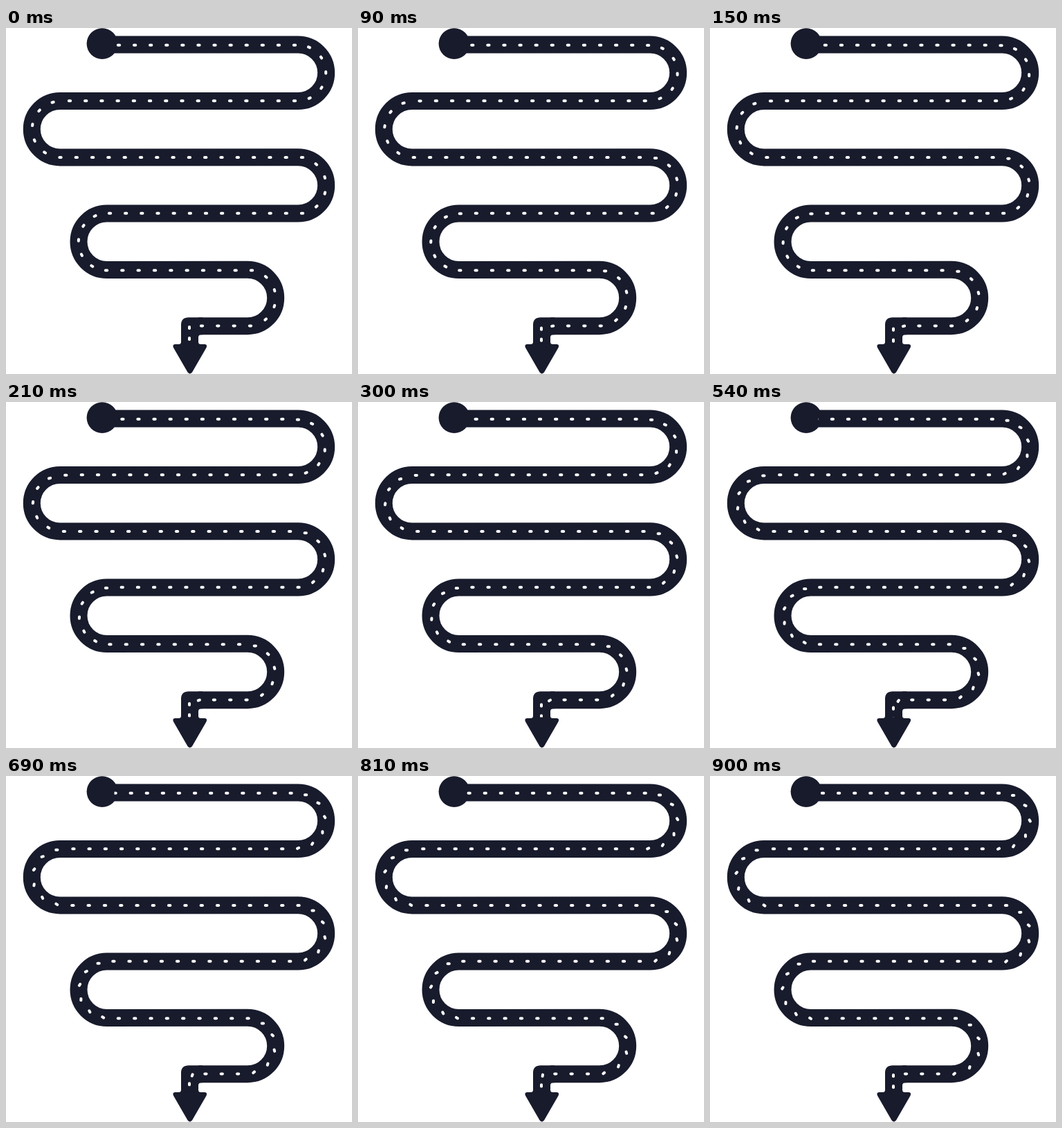
An HTML page with a canvas that plays this animation: 500x500 px, repeating every 930 ms.

```html
<!DOCTYPE html>
<html lang="en">
<head>
<meta charset="utf-8">
<title>Winding road</title>
<style>
  html, body { margin: 0; width: 100%; height: 100%; overflow: hidden; background: #fff; }
  canvas { display: block; width: 500px; height: 500px; }
</style>
</head>
<body>
<canvas id="stage" width="500" height="500"></canvas>
<script>
const ctx = document.getElementById('stage').getContext('2d');
const ROAD = '#181b2c';
const STEP_MS = 30, STEPS = 31;
const HALF_PI = Math.PI / 2;
const dashes = [];

function addRow(from, to, y, count) {
  for (let i = 0; i < count; i++) {
    dashes.push({ x: from + (to - from) * i / (count - 1), y, angle: 0 });
  }
}

// Angles are degrees away from the top of the bend; side is 1 for right, -1 for left.
function addBend(cx, cy, radius, side, first, step, count) {
  for (let i = 0; i < count; i++) {
    const turn = (first + step * i) * Math.PI / 180;
    dashes.push({
      x: cx + side * radius * Math.sin(turn),
      y: cy - radius * Math.cos(turn),
      angle: side * turn
    });
  }
}

addRow(139.9, 417, 24.8, 13);
addBend(422, 64.8, 40.2, 1, 23.5, 33, 5);
addRow(417, 92, 105.2, 15);
addBend(78, 146.2, 40.2, -1, 15, 33, 5);
addRow(78.5, 428, 187, 16);
addBend(422, 227.6, 40.4, 1, 40.5, 32.7, 4);
addRow(428, 150, 267.8, 13);
addBend(146, 309, 41.2, -1, 25, 30.8, 5);
addRow(145, 355, 350.2, 10);
addBend(349.2, 390.2, 40.4, 1, 41, 33, 4);
addRow(353, 283, 430.4, 4);
for (const y of [433, 449, 465]) dashes.push({ x: 265, y, angle: -HALF_PI });

const turnIndex = dashes.length - 4;

function drawRoad() {
  ctx.strokeStyle = ROAD;
  ctx.lineWidth = 25;
  ctx.beginPath();
  ctx.moveTo(139, 24.1);
  ctx.arc(422, 64.8, 40.7, -HALF_PI, HALF_PI);
  ctx.arc(78, 146.2, 40.7, -HALF_PI, HALF_PI, true);
  ctx.arc(422, 227.4, 40.7, -HALF_PI, HALF_PI);
  ctx.arc(145.7, 308.8, 40.7, -HALF_PI, HALF_PI, true);
  ctx.arc(349, 390, 40.7, -HALF_PI, HALF_PI);
  ctx.lineTo(278, 430.7);
  ctx.stroke();

  ctx.beginPath();
  ctx.arc(139, 22.6, 22.4, 0, Math.PI * 2);
  ctx.fill();

  ctx.beginPath();
  ctx.moveTo(284, 418.2);
  ctx.lineTo(264, 418.2);
  ctx.quadraticCurveTo(253, 418.2, 253, 429);
  ctx.lineTo(253, 458);
  ctx.lineTo(278, 458);
  ctx.lineTo(278, 447);
  ctx.quadraticCurveTo(278, 443.2, 282, 443.2);
  ctx.lineTo(284, 443.2);
  ctx.fill();
}

function drawHead() {
  ctx.beginPath();
  ctx.moveTo(253, 453.5);
  ctx.quadraticCurveTo(253, 457, 249.5, 457);
  ctx.lineTo(244.5, 457);
  ctx.quadraticCurveTo(240, 457.5, 242, 462);
  ctx.lineTo(262.5, 497.5);
  ctx.quadraticCurveTo(265.7, 501.5, 269, 497.5);
  ctx.lineTo(289.5, 462);
  ctx.quadraticCurveTo(291.5, 457.5, 287, 457);
  ctx.lineTo(281.5, 457);
  ctx.quadraticCurveTo(278, 457, 278, 453.5);
  ctx.lineTo(278, 455.5);
  ctx.lineTo(253, 455.5);
  ctx.fill();
}

function drawDash(x, y, angle) {
  ctx.save();
  ctx.translate(x, y);
  ctx.rotate(angle);
  ctx.beginPath();
  ctx.roundRect(-3.1, -2, 6.2, 4, 1.8);
  ctx.fill();
  ctx.restore();
}

function render(now) {
  const step = Math.floor(now / STEP_MS) % STEPS;
  const progress = step / (STEPS - 1);

  ctx.fillStyle = '#fff';
  ctx.fillRect(0, 0, 500, 500);
  ctx.fillStyle = ROAD;
  drawRoad();

  // Each dash slides straight to its neighbour; only the last corner rotates it.
  ctx.fillStyle = '#fff';
  for (let i = 0; i < dashes.length - 1; i++) {
    const a = dashes[i], b = dashes[i + 1];
    const spin = i === turnIndex ? (b.angle - a.angle) * progress : 0;
    drawDash(a.x + (b.x - a.x) * progress, a.y + (b.y - a.y) * progress, a.angle + spin);
  }

  ctx.fillStyle = ROAD;
  ctx.fillRect(130, 18, 26.5, 14);
  drawHead();
  requestAnimationFrame(render);
}

requestAnimationFrame(render);
</script>
</body>
</html>
```
